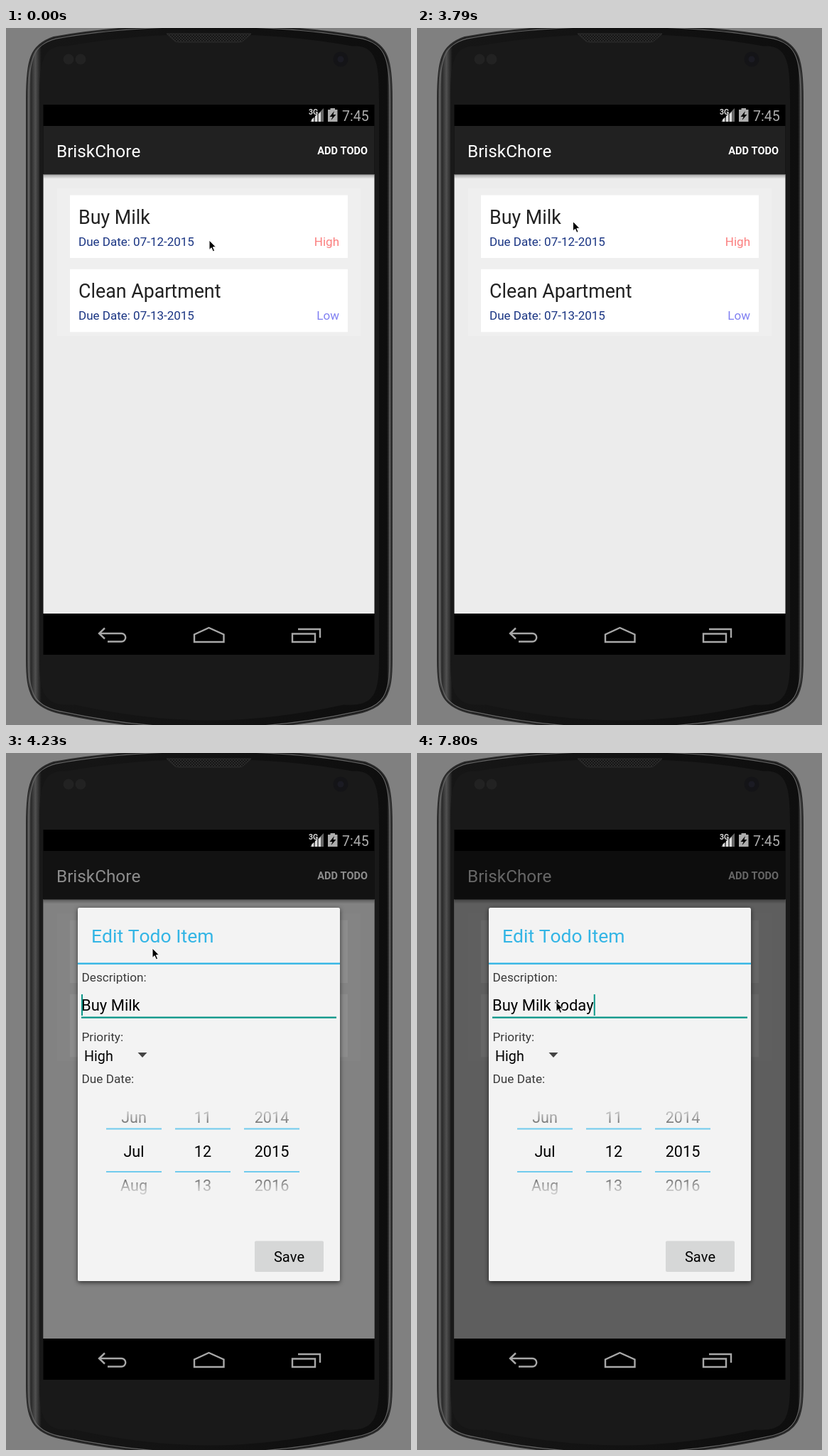
An HTML page for the animation above (8 s loop, 570x982 px).

```html
<!DOCTYPE html>
<html lang="en">
<head>
<meta charset="utf-8">
<title>Todo list on a phone</title>
<style>
  html, body { margin: 0; width: 100%; height: 100%; overflow: hidden; background: #808080; }
  svg { display: block; width: 570px; height: 982px; font-family: Roboto, "Noto Sans", sans-serif; font-kerning: none; }
  .card { fill: #fff; }
  .name { font-size: 26.8px; fill: #212121; }
  .due { font-size: 17px; fill: #1a3583; }
  .label { font-size: 17.2px; fill: #3a3a3a; }
  .line { fill: none; stroke: #a8a8a8; stroke-width: 2.4; }
  .end { text-anchor: end; font-size: 17px; }
  .mid { text-anchor: middle; }
  #entry { white-space: pre; }
</style>
</head>
<body>
<svg viewBox="0 0 570 982" xmlns="http://www.w3.org/2000/svg">
  <defs>
    <linearGradient id="rim" gradientUnits="userSpaceOnUse" x1="28" x2="544" y1="0" y2="0">
      <stop offset="0" stop-color="#222"/><stop offset=".008" stop-color="#5c5c5c"/>
      <stop offset=".014" stop-color="#2a2a2a"/><stop offset=".026" stop-color="#505050"/>
      <stop offset=".042" stop-color="#161616"/><stop offset=".985" stop-color="#0e0e0e"/>
      <stop offset=".993" stop-color="#4a4a4a"/><stop offset="1" stop-color="#222"/>
    </linearGradient>
    <linearGradient id="barShade" x2="0" y2="1">
      <stop offset="0" stop-color="#000" stop-opacity=".3"/><stop offset="1" stop-color="#000" stop-opacity="0"/>
    </linearGradient>
    <linearGradient id="fadeUp" x2="0" y2="1">
      <stop offset=".2" stop-color="#c4c4c4"/><stop offset=".8" stop-color="#777"/>
    </linearGradient>
    <linearGradient id="fadeDown" x2="0" y2="1">
      <stop offset=".2" stop-color="#777"/><stop offset=".85" stop-color="#cacaca"/>
    </linearGradient>
    <pattern id="mesh" width="4" height="4" patternUnits="userSpaceOnUse">
      <rect width="4" height="4" fill="#161616"/><path d="M0 0L4 4M4 0L0 4" stroke="#303030" stroke-width=".8"/>
    </pattern>
    <filter id="shadow" x="-5%" y="-5%" width="110%" height="110%">
      <feDropShadow dx="0" dy="2" stdDeviation="3" flood-opacity=".65"/>
    </filter>
    <filter id="soft" x="-20%" y="-20%" width="140%" height="150%">
      <feDropShadow dx="0" dy="1.5" stdDeviation="1" flood-opacity=".35"/>
    </filter>
  </defs>

  <rect width="570" height="982" fill="#808080"/>

  <g id="phone">
    <path id="body" fill="url(#rim)" stroke="#2a2a2a" stroke-width="2"/>
    <path id="edge" fill="none" stroke="#666" stroke-width="1.2"/>
    <path id="face" fill="#191919"/>
    <path d="M226 8H345L335 17Q333 20 328 20H243Q238 20 236 17Z" fill="url(#mesh)" stroke="#2c2c2c"/>
    <g fill="#222"><circle cx="88" cy="44" r="7.5"/><circle cx="105" cy="44" r="7.5"/></g>
    <circle cx="471" cy="44" r="10.5" fill="#141417"/><circle cx="471" cy="44" r="4.5" fill="#1b1b23"/>
  </g>

  <rect x="52.5" y="108" width="466" height="775" fill="#000"/>
  <g id="status" fill="#adadad">
    <text x="426" y="122" font-size="10.5" font-weight="700" fill="#ddd">3G</text>
    <path d="M447 113V132H428Z" fill="#666"/>
    <path d="M430 132V129L433 126V132ZM435 132V124L438 121V132ZM440 132V121L443 118V132Z" fill="#ddd"/>
    <path d="M456.500 115V113H463V115H466.500V132H453V115Z"/>
    <path d="M462 117L455.500 125H459.500L457.500 130L464.500 122H460.500Z" fill="#000"/>
    <text x="473" y="130.500" font-size="19.5">7:45</text>
  </g>

  <rect x="52.5" y="206" width="466" height="619" fill="#ececec"/>
  <rect x="52.5" y="138" width="466" height="68.500" fill="#212121"/>
  <rect x="52.5" y="206.500" width="466" height="6" fill="url(#barShade)"/>
  <text x="71" y="182" font-size="24.3" fill="#fff">BriskChore</text>
  <text x="509" y="177.500" font-size="14.5" font-weight="700" text-anchor="end" fill="#fff">ADD TODO</text>
  <rect x="72" y="226" width="427" height="208" fill="#efefef"/>
  <g id="cards"></g>
  <rect id="dim" x="52.5" y="138" width="466" height="687"/>

  <g class="line">
    <path d="M139 845.500L131 853L139 860.500M131 853H162.500A5.700 5.700 0 0 1 162.500 864.500H143"/>
    <path d="M265 865V854.500L285.500 845L306.500 854.500V865Z"/>
    <path d="M403 853.500H435V865H403ZM411 847H442V859"/>
  </g>

  <g id="dialog">
    <rect x="101" y="218" width="369" height="526" rx="2.5" fill="#f3f3f3" filter="url(#shadow)"/>
    <text x="120" y="267" font-size="26.5" fill="#33b5e5">Edit Todo Item</text>
    <rect x="101" y="295.500" width="369" height="2.400" fill="#33b5e5"/>
    <g class="label">
      <text x="106.500" y="322">Description:</text>
      <text x="106.500" y="406">Priority:</text>
      <text x="106.500" y="464.500">Due Date:</text>
    </g>
    <text id="entry" x="106" y="363" font-size="22" xml:space="preserve"></text>
    <rect x="106" y="371.500" width="359" height="2.300" fill="#0a9688"/>
    <rect id="caret" y="340" width="2" height="30" fill="#0a9688"/>
    <text x="110" y="433.500" font-size="19.7">High</text>
    <path d="M185.500 422H198.500L192 429Z" fill="#444"/>
    <g id="pickers" font-size="21.6" class="mid"></g>
    <rect x="350" y="687.500" width="97" height="43.500" rx="2" fill="#d6d7d7"/>
    <text class="mid" x="398.500" y="717" font-size="20">Save</text>
    <g id="handle" filter="url(#soft)" fill="#33b5e5">
      <path d="M174 388L189 374L204 388Z" opacity=".7"/>
      <path d="M174 388H204V414Q204 417 201 417H177Q174 417 174 414Z"/>
    </g>
  </g>

  <path id="pointer" d="M0 0V13.500L3.100 10.700L5.300 15.800L7.600 14.800L5.400 9.800H9.500Z" stroke="#fff" stroke-width="1" stroke-linejoin="round"/>
</svg>
<script>
const LOOP = 8000;
const STEP = 147;   // the screen refreshes in coarse steps
const BLINK = 447;
const OPEN = 3940, CLICK = 5120, SPACE = 6020, TYPE = 7200;
const TEXT = 'Buy Milk today';
const $ = id => document.getElementById(id);
const set = (id, name, value) => $(id).setAttribute(name, value);

// Phone outline, moved inwards by an inset.
function shell(inset) {
  const left = 29 + inset, right = 543 - inset;
  const top = -4 + inset * 0.7, bottom = 988 - inset * 0.7;
  return `M${left} 100C${left} 45 ${left + 5} 24 ${left + 38} ${top + 17}
    Q${left + 130} ${top} 286 ${top}T${right - 38} ${top + 17}
    C${right - 5} 24 ${right} 45 ${right} 100V890
    C${right} 938 ${right - 7} 957 ${right - 50} ${bottom - 22}
    Q${right - 151} ${bottom} 286 ${bottom}T${left + 50} ${bottom - 22}
    C${left + 7} 957 ${left} 938 ${left} 890Z`;
}
set('body', 'd', shell(0));
set('edge', 'd', shell(3));
set('face', 'd', shell(18));

const card = (y, name, date, level, color) => `
  <rect class="card" x="90" y="${y}" width="391" height="88.500"/>
  <text class="name" x="102" y="${y + 40}">${name}</text>
  <text class="due" x="102" y="${y + 71.5}">Due Date: ${date}</text>
  <text class="end" x="469" y="${y + 71.5}" fill="${color}">${level}</text>`;
$('cards').innerHTML =
  card(235.5, 'Buy Milk', '07-12-2015', 'High', '#fb7f7f') +
  card(339.8, 'Clean Apartment', '07-13-2015', 'Low', '#8080f2');

const picker = (x, above, value, below) => `
  <text x="${x}" y="521" fill="url(#fadeUp)">${above}</text>
  <text x="${x}" y="569">${value}</text>
  <text x="${x}" y="616.500" fill="url(#fadeDown)">${below}</text>
  <path d="M${x - 39} 529.500h78m0 60.500h-78" fill="none" stroke="#70cbed" stroke-width="2.200"/>`;
$('pickers').innerHTML =
  picker(180, 'Jun', 'Jul', 'Aug') + picker(277, 11, 12, 13) + picker(374, 2014, 2015, 2016);

const clamp = (v, max) => Math.max(0, Math.min(max, v));
const stepsSince = (t, start) => Math.floor((t - start) / STEP) + 1;
const progress = (t, start, steps) => clamp(stepsSince(t, start) / steps, 1);
const easeOut = p => 1 - (1 - p) ** 2;

const home = { x: 286, y: 299 };
const moves = [
  { start: 150, steps: 3, x: 210, y: 277 },
  { start: 1700, steps: 5, x: 229, y: 273 },
  { start: 2590, steps: 2, x: 219.5, y: 272.5 },
  { start: OPEN, steps: 2, x: 206, y: 275 },
  { start: 4390, steps: 5, x: 202.5, y: 361 },
  { start: CLICK, steps: 2, x: 195, y: 353 },
  { start: 6460, steps: 2, x: 196, y: 350.5 }
];

function pointerAt(t) {
  return moves.reduce((from, to) => {
    const p = easeOut(progress(t, to.start, to.steps));
    return { x: from.x + (to.x - from.x) * p, y: from.y + (to.y - from.y) * p };
  }, home);
}

function caretOn(t) {
  const since = t < CLICK ? OPEN + STEP : CLICK;
  return t >= TYPE || Math.floor((t - since) / BLINK) % 2 === 0;
}

function draw(t) {
  const { x, y } = pointerAt(t);
  const typed = t < SPACE ? 8 : 9 + clamp(stepsSince(t, TYPE), 5);
  const entry = $('entry');
  entry.textContent = TEXT.slice(0, typed);

  set('pointer', 'transform', `translate(${x} ${y})`);
  set('dim', 'opacity', 0.6 * easeOut(progress(t, OPEN, 4)));
  set('dialog', 'opacity', easeOut(progress(t, OPEN, 2)));
  set('handle', 'opacity', t < CLICK ? 0 : 0.6 * (1 - progress(t, SPACE, 2)));
  set('caret', 'opacity', caretOn(t) ? 1 : 0);
  set('caret', 'x', 106 + (t < CLICK ? 0 : entry.getComputedTextLength()));
}

const start = performance.now();
function tick() {
  draw((performance.now() - start) % LOOP);
  requestAnimationFrame(tick);
}
tick();
</script>
</body>
</html>
```
